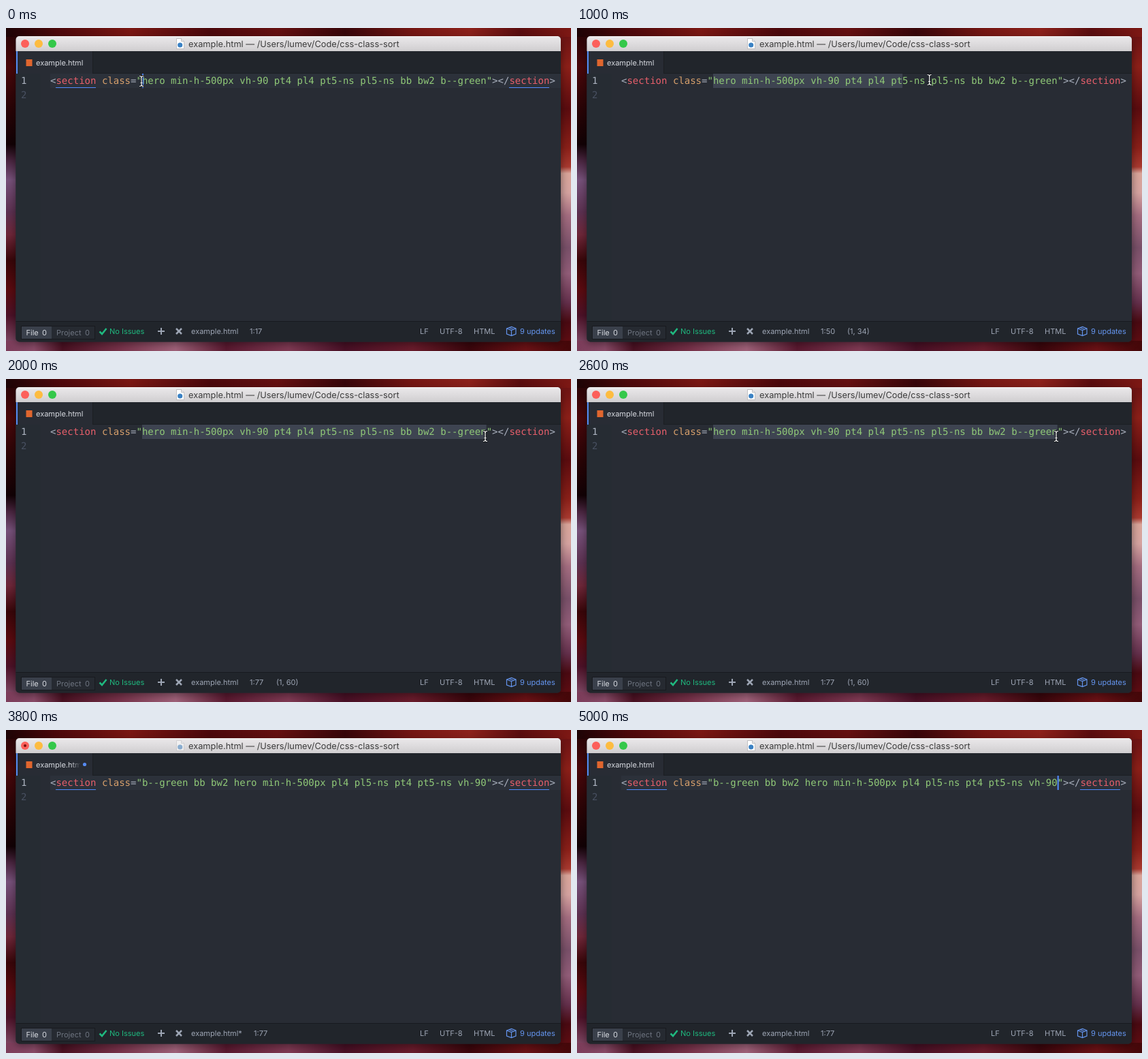
These frames come from a looping animation (830 by 474 pixels, 5.2 s). An HTML page:

```html
<!DOCTYPE html>
<html lang="en">
<head>
<meta charset="utf-8">
<title>Sorting classes in an editor</title>
<style>
  html, body { margin: 0; width: 100%; height: 100%; overflow: hidden; background: #3a0609; }
  svg { position: absolute; left: 0; top: 0; }
  /* Soft stand-in for the desktop picture: one gradient per visible edge. */
  #desktop {
    position: absolute; width: 830px; height: 474px;
    background:
      linear-gradient(90deg, #1d0305, #4c080b 9%, #7a1713 22%, #4b080c 36%, #651011 48%, #38060a 60%, #741613 72%, #8c211b 82%, #5a0d0f 91%, #7d1814) 0 0 / 830px 13px no-repeat,
      linear-gradient(90deg, #7b3c5a, #8a4b68 5%, #4a1122 10%, #78324a 20%, #a0627a 30%, #5a1930 39%, #803a54 50%, #491026 60%, #6a1c2c 72%, #3b060c 82%, #6c1216 92%, #430709) 0 459px / 830px 15px no-repeat,
      linear-gradient(180deg, #240406, #4a080b 12%, #290406 25%, #120205 36%, #49253f 41%, #76517a 47%, #5c3151 57%, #6e2739 64%, #390609 72%, #5b0b10 81%, #4c1228 89%, #8d5775) 0 0 / 16px 474px no-repeat,
      linear-gradient(180deg, #661113, #8c2019 12%, #5b0c0f 25%, #8a2019 37%, #a93a30 43%, #d9a59a 45%, #d5a3a0 51%, #a46d80 58%, #795069 68%, #925d78 76%, #64304c 85%, #4a0a12 91%, #680f13) 814px 0 / 16px 474px no-repeat;
  }
  text { font: 11px Inter, sans-serif; fill: #9da5b4; white-space: pre; text-rendering: geometricPrecision; }
  .code { font: 14px "DejaVu Sans Mono", monospace; fill: #abb2bf; }
  .tag { fill: #e85f6b; }
  .attr { fill: #d7a06c; }
  .str { fill: #90c978; }
</style>
</head>
<body>
<div id="desktop"></div>
<svg width="830" height="474" viewBox="0 0 830 474">
  <defs>
    <linearGradient id="bar" x2="0" y2="1">
      <stop stop-color="#ebe9eb"/><stop offset="1" stop-color="#d0ced0"/>
    </linearGradient>
    <linearGradient id="fade">
      <stop stop-color="#282c34" stop-opacity="0"/><stop offset=".75" stop-color="#282c34"/>
    </linearGradient>
    <clipPath id="frame"><rect x="14.5" y="12" width="800.5" height="448.5" rx="5"/></clipPath>
    <filter id="blur" x="-10%" y="-10%" width="120%" height="120%"><feGaussianBlur stdDeviation="6"/></filter>
  </defs>

  <rect x="14" y="16" width="802" height="448" rx="6" opacity=".4" filter="url(#blur)"/>
  <g clip-path="url(#frame)">
    <rect x="14" y="12" width="802" height="449" fill="#282c34"/>
    <rect x="14" y="67" width="37" height="363" fill="#262c33"/>

    <!-- title bar -->
    <rect x="14" y="12" width="802" height="22" fill="url(#bar)"/>
    <circle cx="28" cy="23" r="6" fill="#fc605b"/>
    <circle cx="48" cy="23" r="6" fill="#fdbc40"/>
    <circle cx="68" cy="23" r="6" fill="#34c84a"/>
    <g id="docIcon">
      <path d="M250.5 15.5h7l4 4v11h-11z" fill="#fff" stroke="#b4b4b6" stroke-width=".8"/>
      <path d="M257.5 15.5v4h4" fill="#e5e5e7" stroke="#b4b4b6" stroke-width=".8"/>
      <circle cx="255.7" cy="25" r="3.6" fill="#3b82c4"/>
    </g>
    <text x="268" y="28" style="font-size:12.8px;fill:#3c3c3c">example.html — /Users/lumev/Code/css-class-sort</text>

    <!-- tabs -->
    <rect x="14" y="34" width="802" height="33" fill="#21252b"/>
    <path d="M14 66.5H815" stroke="#1b1e23"/>
    <rect x="15" y="34" width="112" height="33" fill="#282c34"/>
    <path d="M127.5 34V67" stroke="#1b1e23"/>
    <rect x="15" y="34" width="2" height="33" fill="#568af2"/>
    <rect x="29.5" y="46" width="9" height="10" fill="#e0662e"/>
    <text x="44" y="55" style="fill:#d7dae0">example.html</text>

    <!-- editor -->
    <rect id="lineGlow" x="65" y="67" width="750" height="21" fill="#2c313a"/>
    <rect id="selection" x="200" y="67" height="21" fill="#3e4451"/>
    <text class="code" x="22" y="82">1</text>
    <text class="code" x="22" y="103" style="fill:#495162">2</text>
    <text class="code" x="65" y="82">&lt;<tspan class="tag">section</tspan> <tspan class="attr">class</tspan>=<tspan class="str">"<tspan id="classes"></tspan>"</tspan>&gt;&lt;/<tspan class="tag">section</tspan>&gt;</text>
    <path id="underlines" d="M73 87.5H132M739 87.5H798" stroke="#528bff"/>
    <rect id="caret" y="67" width="2" height="21" fill="#528bff"/>

    <!-- status bar -->
    <rect x="14" y="430" width="802" height="31" fill="#21252b"/>
    <path d="M14 430.5H815" stroke="#181a1f"/>
    <rect x="22.5" y="437.5" width="108" height="19" fill="#262a31" stroke="#181a1f"/>
    <rect x="23" y="438" width="44" height="18" fill="#3a404b"/>
    <text x="29.5" y="451" style="fill:#d7dae0">File</text>
    <text x="53" y="451" style="fill:#d7dae0">0</text>
    <g opacity=".6"><text x="74" y="451">Project</text><text x="116" y="451">0</text></g>
    <g fill="none" stroke="#9da5b4" stroke-width="2.6">
      <path d="M137.5 445.5l3.5 3.5 6.5-8" stroke="#1fb97f"/>
      <path d="M223 445h10M228 440v10" stroke-width="2"/>
      <path d="M250 441l8 8M258 441l-8 8"/>
    </g>
    <text x="152" y="449" style="fill:#1fb97f">No Issues</text>
    <text id="file" x="272" y="449"></text>
    <text id="position" y="449"></text>
    <text id="count" x="397" y="449"></text>
    <text x="608" y="449">LF</text>
    <text x="637" y="449">UTF-8</text>
    <text x="687" y="449">HTML</text>
    <path d="M735.5 441l7-2.5 6.5 2.5v8l-6.5 2.5-7-2.5zl7 2.5 6.5-2.5M742.5 443.5v8M739 439.7l6.7 2.6" fill="none" stroke="#6494ed" stroke-width="1.2"/>
    <text x="755" y="449" style="fill:#6494ed">9 updates</text>
  </g>
  <path d="M19 12.5H811" stroke="#f7f6f7"/>

  <g id="unsaved">
    <circle cx="28" cy="23" r="2" fill="#76100d"/>
    <rect x="96" y="42" width="18" height="18" fill="url(#fade)"/>
    <circle cx="115.5" cy="50.5" r="2.6" fill="#568af2"/>
  </g>
  <g id="pointer" fill="none">
    <path id="beam" d="M-3-7.5Q0-7.5 0-5Q0-7.5 3-7.5M0-5V5M-3 7.5Q0 7.5 0 5Q0 7.5 3 7.5M-1.5 2.5h3" stroke="#15181c" stroke-width="3"/>
    <use href="#beam" style="stroke:#fff"/>
    <path d="M-3-7.5Q0-7.5 0-5Q0-7.5 3-7.5M0-5V5M-3 7.5Q0 7.5 0 5Q0 7.5 3 7.5M-1.5 2.5h3" stroke="#fff" stroke-width="1.2"/>
  </g>
</svg>
<script>
  const LOOP = 5200, STEP = 200;
  const CHAR = 8.428, LEFT = 200;
  const SORT_AT = 2800, UNSAVED_FROM = 3200, SAVED_AT = 4800;
  const unsorted = "hero min-h-500px vh-90 pt4 pl4 pt5-ns pl5-ns bb bw2 b--green";
  const sorted = unsorted.split(" ").sort().join(" ");

  const el = id => document.getElementById(id);
  const show = (id, on) => el(id).style.display = on ? "" : "none";
  const setText = (id, value) => { el(id).textContent = value; };
  const clamp = (v, lo, hi) => Math.max(lo, Math.min(hi, v));
  const smooth = p => { p = clamp(p, 0, 1); return p * p * (3 - 2 * p); };

  const pointerX = t => 199 + 505 * smooth((t - 200) / 1360);
  const pointerY = t => 78 - 2 * smooth((t - 200) / 600) + 8 * smooth((t - 1100) / 700);

  function draw(t) {
    const isSorted = t >= SORT_AT;
    const unsaved = t >= UNSAVED_FROM && t < SAVED_AT;
    // The selection trails slightly behind the pointer.
    const dragged = clamp(Math.round((pointerX(t - 75) - LEFT) / CHAR), 0, unsorted.length);
    const selected = isSorted ? 0 : dragged;
    const column = isSorted ? sorted.length : dragged;
    const blinkOn = !isSorted || (t - 2600) % 800 < 400;

    setText("classes", isSorted ? sorted : unsorted);
    el("selection").setAttribute("width", selected * CHAR);
    for (const id of ["lineGlow", "underlines"]) show(id, !selected);
    show("caret", !selected && blinkOn);
    el("caret").setAttribute("x", LEFT + column * CHAR);

    setText("file", "example.html" + (unsaved ? "*" : ""));
    setText("position", "1:" + (column + 17));
    el("position").setAttribute("x", unsaved ? 364 : 358);
    setText("count", selected ? `(1, ${Math.min(selected + 1, unsorted.length)})` : "");
    show("unsaved", unsaved);
    el("docIcon").setAttribute("opacity", unsaved ? 0.5 : 1);

    show("pointer", !isSorted);
    el("pointer").setAttribute("transform", `translate(${pointerX(t)} ${pointerY(t)})`);
  }

  const start = performance.now();
  function tick() {
    const t = (performance.now() - start) % LOOP;
    draw(Math.floor(t / STEP) * STEP);
    requestAnimationFrame(tick);
  }
  tick();
</script>
</body>
</html>
```
